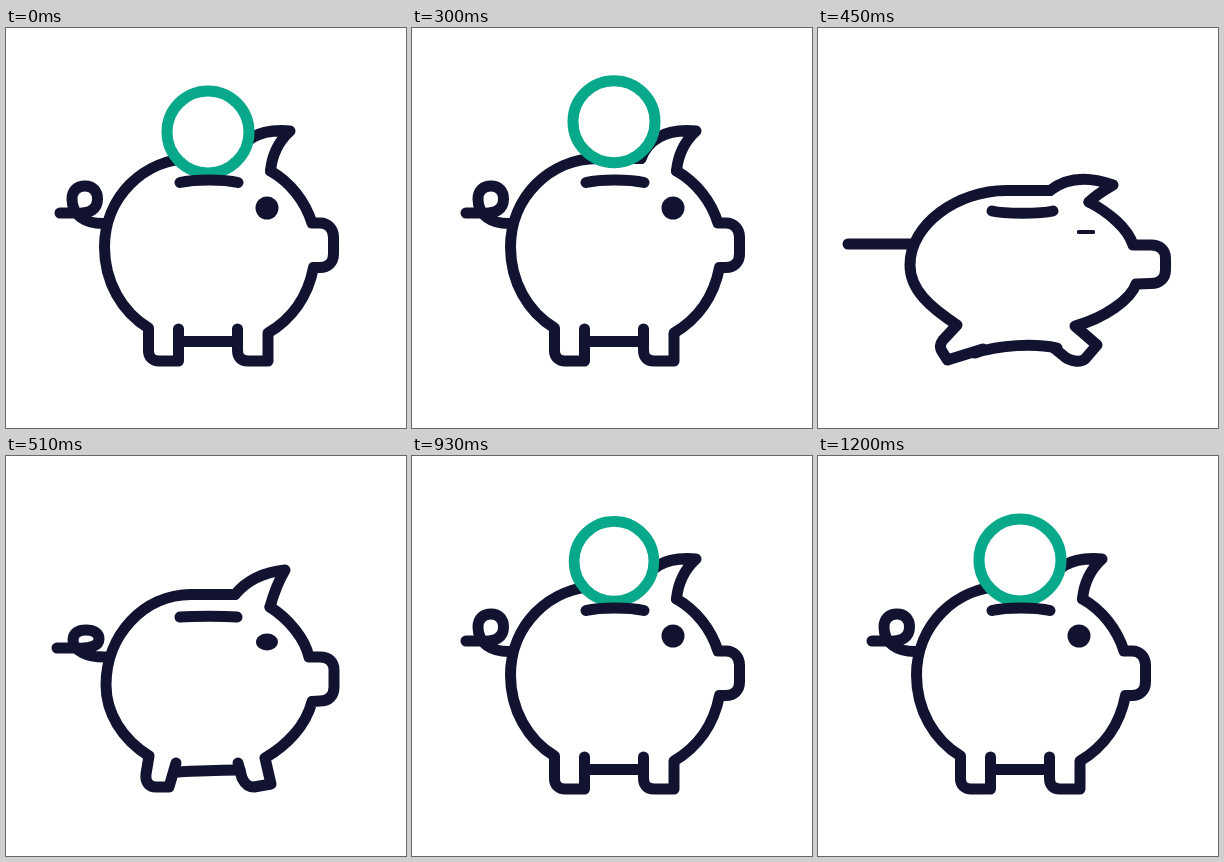
An HTML page for the animation above (1760 ms loop, 400x400 px).

```html
<!DOCTYPE html>
<html lang="en">
<head>
<meta charset="utf-8">
<title>Piggy bank</title>
<style>
html, body { margin: 0; width: 100%; height: 100%; overflow: hidden; background: #fff; }
svg { display: block; width: 100%; height: 100%; }
.line { fill: none; stroke: #121331; stroke-width: 11; stroke-linecap: round; stroke-linejoin: round; }
</style>
</head>
<body>
<svg viewBox="0 0 400 400">
  <clipPath id="above"><rect id="mask" x="0" y="-100" width="400" height="254"/></clipPath>
  <path id="back" class="line"/>
  <path id="ear" class="line"/>
  <path id="front" class="line"/>
  <path id="belly" class="line"/>
  <path id="tail" class="line"/>
  <rect id="eye" fill="#121331"/>
  <g clip-path="url(#above)">
    <circle id="coin" r="41" fill="#fff" stroke="#08a88a" stroke-width="11"/>
  </g>
  <path id="slot" class="line"/>
</svg>
<script>
const LOOP = 1760, STEP = 30;
const el = id => document.getElementById(id);

// Every part has the same path structure in each pose.
const parts = {
  back: {
    rest: 'M172.5 301 L172.5 333 L153 333 C147 333 142.5 329 142.5 323 L142.5 300 C116 284 98.5 254 98.5 219 C98.5 170 137 130.5 186 130.5 L229 130.5',
    squash: 'M165 321 L129.5 332 L125 325 C121 319 122 316 125 312 L139 297 C112 279 92 262 92 237 C92 196 140 162.5 188 162.5 L232 162.5',
    bounce: 'M170 307 L163 331 L150 331 C143 331 139 326 140 318 L143 300 C116 283 100 257 100 229 C100 179 138 138.5 185 138.5 L229 138.5'
  },
  ear: {
    rest: 'M229 130.5 C238 107 260 101 284 103 C273 113 266 127 264.5 143',
    squash: 'M232 162.5 C248 150 270 148 295 157 C288 161 279 166 271 174',
    bounce: 'M229 138.5 C242 123 259 116 279 114 C272 126 268 136 264 151',
    late: 'M229 130.5 C237 110 258 104 286 106 C273 117 266 130 264.5 143'
  },
  front: {
    rest: 'M264.5 143 C284 154 299 173 306 195 L314 195 C322 195 327.5 201 327.5 209 L327.5 226 C327.5 234 322 239.5 314 239.5 L307.5 239.5 C302 268 286 291 262 305 L262 333 L242 333 C235 333 231.5 329 231.5 322 L231.5 301',
    squash: 'M271 174 C290 184 310 200 315 217 L333 217 C342 217 347.5 222 347.5 230 L347.5 242 C347.5 250 342 255.5 333 255.5 L318 256 C313 271 287 290 257 298 L279 317 L267 331 C262 335 252 333 247 329 L236 320',
    bounce: 'M264 151 C283 163 299 183 303 201 L314 201 C323 201 328 206 328 214 L328 231 C328 240 323 245 314 245 L306 245.5 C300 270 280 290 259 302 L265 328 L248 331 C242 331 239 328 236 322 L232 307'
  },
  belly: {
    rest: 'M173 313.5 C192 313.5 212 313.5 231 313.5',
    squash: 'M157 325 C182 317 216 315 239 320',
    bounce: 'M170 316 C192 315 212 314 234 314'
  },
  tail: {
    rest: 'M54 185 L70 185 C84 186 91.5 181 91.5 171 C91.5 163 87 158 79 158 C71 158 66 163 66 171 C66 187 79 196.5 100 195.5',
    squash: 'M30 216 L38 216 C44 216 48 216 52 216 C55 216 58 216 61 216 C64 216 68 216 72 216 C78 216 85 216 92 216',
    bounce: 'M51 192 L70 192 C84 193 93 190 93 183 C93 177 88 174 80 174 C72 174 67 177 67 184 C67 194 80 202 102 201',
    late: 'M54 186 L70 186 C84 187 91 183 91 174 C91 167 87 163 79 163 C71 163 67 168 67 175 C67 188 79 197 100 196'
  },
  slot: {
    rest: 'M174 154.5 C188 151 218 151 232 154.5',
    squash: 'M174 183 C186 186 223 186 235 183',
    bounce: 'M174 161 C188 160 218 160 231 161'
  },
  // centre x, centre y, half width, half height, corner roundness
  eye: {
    rest: '261 180 11.5 11.5 1',
    squash: '268 204 9 2 0.2',
    bounce: '261 186 11 8.5 1'
  }
};

const smooth = u => u * u * (3 - 2 * u);
const out = u => 1 - (1 - u) * (1 - u);
const outCubic = u => 1 - (1 - u) ** 3;
const pow = p => u => u ** p;

// Each key: time, value, easing used to arrive there.
const poseKeys = [
  [0, 'rest'], [350, 'rest'], [450, 'squash', smooth], [510, 'bounce', pow(1.4)],
  [690, 'late', outCubic], [780, 'rest', out]
];
const riseKeys = [
  [0, 0], [180, -36, smooth], [430, 125, pow(2.5)], [750, 125], [751, 0],
  [930, 0], [990, -18, out], [1080, -8.5, pow(1.5)], [1200, 0, out]
];
const sizeKeys = [[0, 1], [440, 1], [441, 0], [780, 0], [960, 1, out]];

function span(keys, t) {
  let i = keys.length - 1;
  while (i > 0 && keys[i][0] > t) i--;
  const a = keys[i], b = keys[i + 1];
  if (!b) return [a[1], a[1], 0];
  const u = (t - a[0]) / (b[0] - a[0]);
  return [a[1], b[1], b[2] ? b[2](u) : u];
}

function value(keys, t) {
  const [a, b, u] = span(keys, t);
  return a + (b - a) * u;
}

const NUM = /-?\d+(\.\d+)?/g;
function mix(part, [a, b, u]) {
  const from = part[a] || part.rest;
  const to = (part[b] || part.rest).match(NUM);
  let i = 0;
  return from.replace(NUM, n => (+n + (to[i++] - n) * u).toFixed(2));
}

function set(id, attrs) {
  for (const k in attrs) el(id).setAttribute(k, attrs[k]);
}

function draw(t) {
  const pose = span(poseKeys, t);
  for (const id in parts) {
    if (id !== 'eye') set(id, { d: mix(parts[id], pose) });
  }

  const [x, y, w, h, k] = mix(parts.eye, pose).split(' ').map(Number);
  set('eye', { x: x - w, y: y - h, width: 2 * w, height: 2 * h, rx: w * k, ry: h * k });

  // The coin vanishes below the slot and grows back out of it.
  const slotY = +mix(parts.slot, pose).match(NUM)[1];
  set('mask', { height: slotY + 100 });
  const s = value(sizeKeys, t);
  const cy = 150.5 - 46.5 * s + value(riseKeys, t);
  set('coin', { transform: `translate(202 ${cy}) scale(${s})` });
}

const start = performance.now();
function tick() {
  const t = (performance.now() - start) % LOOP;
  draw(Math.floor(t / STEP) * STEP);
  requestAnimationFrame(tick);
}
tick();
</script>
</body>
</html>
```
